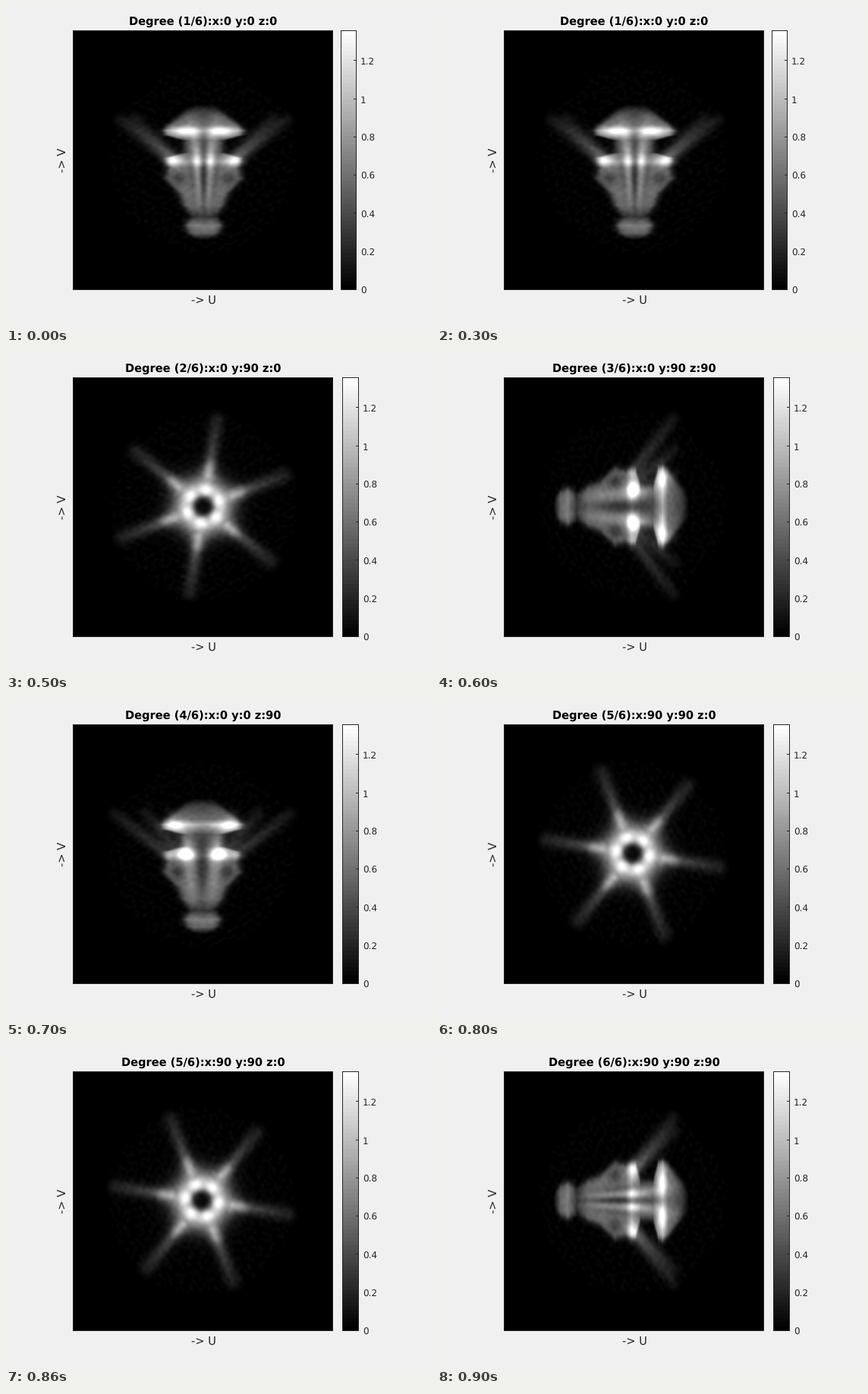
Animation, 560 px wide and 420 px high, one loop 1000 ms. Source, as a matplotlib script:

```python
import numpy as np
import matplotlib.pyplot as plt
from matplotlib.animation import FuncAnimation
from matplotlib.patches import Rectangle

W, H, DPI = 560, 420, 100
L, R, T, B = 88, 431, 32, 374
VMAX = 1.361
INK = "#262626"
PX = 72 / DPI

plt.rcParams.update({"font.family": "DejaVu Sans", "text.hinting": "none"})
X, Y = np.meshgrid(np.arange(L + 1, R - 1) + 0.5, np.arange(T + 1, B - 1) + 0.5)
ARMS = np.radians(21 + 60 * np.arange(6))

# Outline of the body: position on its axis, half width, brightness
OUTLINE = np.array([
    (-74, 12, 0), (-62, 26, .27), (-46, 47, .42), (-39, 52, .72), (-33, 50, .55),
    (-26, 25, .33), (-10, 25, .38), (-3, 48, .52), (2, 49, .62), (10, 46, .42),
    (24, 51, .38), (44, 32, .42), (60, 26, .40), (74, 17, .20), (86, 24, .47),
    (96, 19, .38), (105, 10, 0),
]).T


def blob(x, y, cx, cy, rx, ry):
    return np.exp(-((x - cx) / rx) ** 2 - ((y - cy) / ry) ** 2)


def strut(x, y, ax, ay, bx, by):
    """Position along a segment (0..1) and distance from it."""
    dx, dy = bx - ax, by - ay
    t = np.clip(((x - ax) * dx + (y - ay) * dy) / (dx * dx + dy * dy), 0, 1)
    return t, np.hypot(x - ax - t * dx, y - ay - t * dy)


def side(v, u, spread, column, rim, knot, glow):
    """Body from the side: v across, u along the axis."""
    pos, width, level = OUTLINE
    a = abs(v)
    img = np.interp(u, pos, level) * 0.5 * (1 - np.tanh((a - np.interp(u, pos, width)) / 5))

    # Paired columns, closing towards the tip
    c = column * (1 - u / 200)
    fade = np.exp(-((u - 12) / 40) ** 2 - (v / (1.6 * c)) ** 2)
    img *= 1 - 0.5 * fade * np.cos(np.pi * v / c)

    img += 0.35 * blob(a, u, rim, -38, 13, 7)
    img += glow * blob(a, u, knot, 0, 9, 8)
    img -= 0.13 * blob(a, u, 33, 24, 9, 8)
    for s in spread(ARMS):
        t, d = strut(v, u, 46 * s, 0, 117 * s, -53)
        img += 0.2 * (1 - 0.6 * t) * np.exp(-(d / 8.5) ** 2)
    return img


def star(x, y):
    """Body seen along its axis."""
    r = np.hypot(x, y)
    wave = np.cos(6 * (np.arctan2(y, x) - ARMS[0]))
    img = 0.47 / (1 + (r / (45 + 3 * wave)) ** 8)
    img += (0.45 + 0.1 * wave) * np.exp(-((r - 22) / 9.5) ** 2)
    img *= 1 - 0.92 * np.exp(-(r / 13) ** 4)
    for k in ARMS:
        c, s = np.cos(k), np.sin(k)
        t, d = strut(x, y, 42 * c, 42 * s, 114 * c, 114 * s)
        img += 0.3 * (1 - 0.6 * t) * np.exp(-(d / (7 + 3 * t)) ** 2)
        img += 0.16 * blob(x, y, 53 * c, 53 * s, 8, 8)
    return img


def grain(x, y, rng):
    """Smooth noise from random plane waves."""
    out = np.zeros_like(x)
    for k, a, p in rng.uniform((0.3, 0, 0), (0.9, np.pi, 2 * np.pi), (40, 3)):
        out += np.cos(k * (x * np.cos(a) + y * np.sin(a)) + p)
    return out / np.sqrt(20)


def front(v, u):
    return side(v, u, np.cos, column=10, rim=25, knot=44, glow=0.12)


def flank(v, u):
    return side(v, u, np.sin, column=20, rim=37, knot=23, glow=0.42)


def top(x, y):
    return star(x, -y)


# Caption, shape, quarter turn, centre
VIEWS = [
    ("x:0 y:0 z:0", front, False, 260.5, 203),
    ("x:0 y:90 z:0", top, False, 260, 202),
    ("x:0 y:90 z:90", flank, True, 258.5, 202),
    ("x:0 y:0 z:90", flank, False, 258.5, 203),
    ("x:90 y:90 z:0", top, True, 258, 202),
    ("x:90 y:90 z:90", front, True, 258.5, 202),
]


def render(shape, turned, cx, cy):
    x, y = X - cx, Y - cy
    if turned:
        x, y = y, -x
    noise = grain(x, y, np.random.default_rng(4))
    disc = 1 / (1 + (np.hypot(x, y) / 124) ** 40)
    return np.clip(shape(x, y) + disc * (0.012 + 0.01 * noise), 0, 1)


images = [render(*view[1:]) for view in VIEWS]

fig = plt.figure(figsize=(W / DPI, H / DPI), dpi=DPI, facecolor="#f0f0f0")
ax = fig.add_axes([0, 0, 1, 1])


def box(x, y, w, h, z):
    return ax.add_patch(Rectangle((x, y), w, h, fc=INK, lw=0, antialiased=False, zorder=z))


def panel(x0, x1, data):
    """Image with a thin dark border."""
    back = box(x0, T, x1 - x0, B - T, -1)
    img = ax.imshow(data, extent=(x0 + 1, x1 - 1, B - 1, T + 1), vmin=0, vmax=1,
                    cmap=plt.get_cmap("gray", 64), aspect="auto", interpolation="nearest")
    return back, img


def label(x, y, text, size, **kw):
    kw = {"color": INK, "ha": "center", "va": "baseline", **kw}
    return ax.text(x, y, text, fontsize=size * PX, **kw)


_, pic = panel(L, R, images[0])
back, bar = panel(441, 462, (np.arange(64)[::-1, None] + 0.5) / 64)
ax.set_xlim(0, W)
ax.set_ylim(H, 0)
ax.axis("off")

title = label(260, 25, "", 14.667, weight="bold", color="black")
label(260.5, 393, "-> U", 14.667)
label(79, 203, "-> V", 14.667, rotation=90, rotation_mode="anchor")

ticks = []
for value in np.arange(7) * 0.2:
    y = B - 0.5 - value / VMAX * (B - T)
    mark = box(0, np.floor(y), 4, 1, 2)
    ticks.append((mark, label(0, y + 5.4, f"{value:.2g}", 12, ha="left")))


def update(i):
    n = max(0, i - 4)
    x0, x1 = (441, 462) if n == 0 else (443, 465)
    pic.set_data(images[n])
    title.set_text(f"Degree ({n + 1}/6):{VIEWS[n][0]}")
    bar.set_extent((x0 + 1, x1 - 1, B - 1, T + 1))
    back.set_x(x0)
    back.set_width(x1 - x0)
    for mark, text in ticks:
        mark.set_x(x1 - 4)
        text.set_x(x1 + 5)
    return []


anim = FuncAnimation(fig, update, frames=10, interval=100, repeat=True, repeat_delay=0)
plt.show()
```
